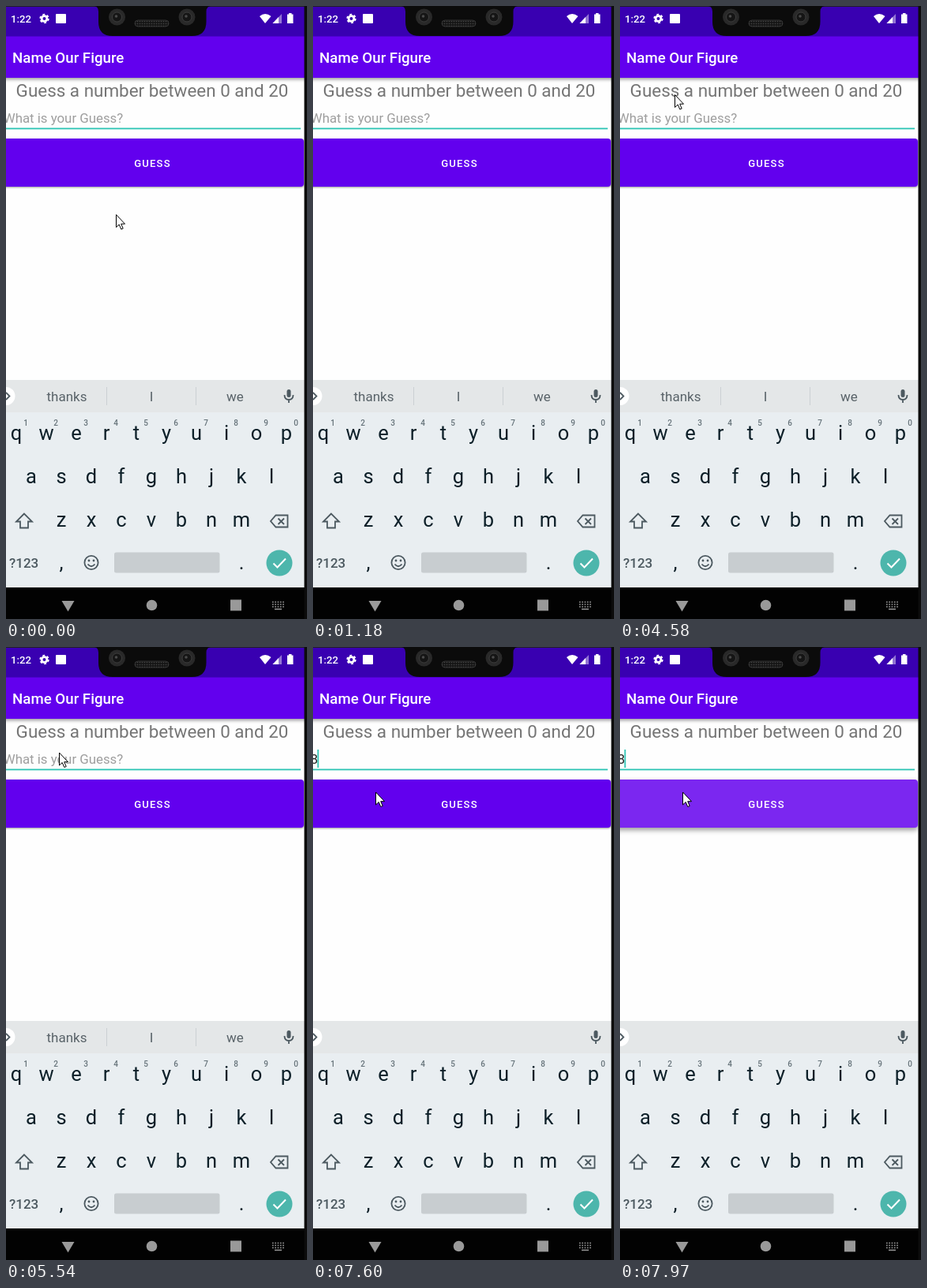
Recreate the animation shown at these times as an HTML page. Size 381 by 777 pixels, loop 8 s.

```html
<!DOCTYPE html>
<html lang="en">
<head>
<meta charset="utf-8">
<title>Number game</title>
<style>
  html, body { margin: 0; width: 100%; height: 100%; overflow: hidden; background: #fff; }
  svg { display: block; width: 381px; height: 777px; font-family: Roboto, sans-serif; }
  .mid { text-anchor: middle; }
  .key { font-size: 25.5px; fill: #0c1f28; }
  .digit { font-size: 10px; font-weight: 500; fill: #66737a; }
  .word { font-size: 17px; fill: #586268; }
  .line { fill: none; stroke: #4c5960; stroke-width: 1.8; }
  .medium { font-weight: 500; }
</style>
</head>
<body>
<svg viewBox="0 0 381 777">
  <defs>
    <clipPath id="buttonShape"><rect x="-7" y="168" width="384" height="61" rx="4"/></clipPath>
    <pattern id="mesh" width="3" height="3" patternUnits="userSpaceOnUse">
      <rect width="3" height="3" fill="#161616"/><circle cx="1.5" cy="1.5" r=".8" fill="#444"/>
    </pattern>
  </defs>
  <rect width="381" height="777" fill="#fefefe"/>

  <!-- app bar and status bar -->
  <rect x="-7" y="38" width="390" height="53" fill="#6200ee" style="filter:drop-shadow(0 2px 2px #0006)"/>
  <rect width="381" height="38.500" fill="#3900b1"/>
  <rect width="381" height="1" fill="#222"/>
  <text x="8" y="72" font-size="18.7" class="medium" fill="#fff">Name Our Figure</text>
  <text x="6" y="21" font-size="13.2" class="medium" fill="#fff">1:22</text>
  <g fill="#fff">
    <circle cx="48.500" cy="16" r="3.400" fill="none" stroke="#fff" stroke-width="2.800"/>
    <circle cx="48.500" cy="16" r="5.300" fill="none" stroke="#fff" stroke-width="1.800" stroke-dasharray="2.800 2.750"/>
    <rect x="63" y="10" width="13" height="12" rx="1"/>
    <path d="M328 22 321 13Q328 7 335.500 13Z"/>
    <path d="M337.500 22 349 10V22Z" opacity=".45"/>
    <path d="M337.500 22 345 14V22Z"/>
    <path d="M356 10.500H358V9H361.500V10.500H363.500V22H356Z"/>
  </g>
  <path d="M112 0Q117 1 117 7V20Q117 38 135 38H235Q253.500 38 253.500 20V7Q253.500 1 259 0Z" fill="#0b0b0b"/>
  <g id="cameras"></g>
  <rect x="163" y="18" width="43" height="8" rx="4" fill="url(#mesh)" stroke="#3a3a3a" stroke-width=".8"/>

  <!-- form -->
  <text x="185" y="115" font-size="22.45" fill="#757575" class="mid">Guess a number between 0 and 20</text>
  <text id="hint" x="-3.300" y="148" font-size="16.83">What is your Guess?</text>
  <text id="entry" x="-3.300" y="148" font-size="16.83" fill="#222">8</text>
  <rect y="154.500" width="373" height="1.800" fill="#2cc4b4"/>
  <rect id="caret" x="5.500" y="130" width="1.800" height="23" fill="#2cc4b4"/>
  <rect id="button" x="-7" y="168" width="384" height="61" rx="4" fill="#6200ee"/>
  <circle id="ripple" cx="160" cy="197" r="200" fill="#8a3df1" clip-path="url(#buttonShape)"/>
  <text x="185.500" y="204" font-size="13.1" letter-spacing="1.17" class="mid medium" fill="#fff">GUESS</text>

  <!-- keyboard -->
  <rect y="474" width="381" height="42" fill="#e4e7e8"/>
  <rect y="515" width="381" height="222" fill="#e9eef1"/>
  <circle cy="494.500" r="11.500" fill="#fff"/>
  <path d="M0 490 4.500 494.500 0 499" class="line"/>
  <g id="suggestions">
    <text x="77" y="501" class="word mid">thanks</text>
    <text x="184" y="501" class="word mid">I</text>
    <text x="290" y="501" class="word mid">we</text>
    <path d="M127.500 483V506M240.500 483V506" stroke="#cbd0d3"/>
  </g>
  <rect x="355.500" y="486" width="5" height="10" rx="2.500" fill="#4c5960"/>
  <path d="M352.500 493Q352.500 499 358 499T363.500 493M358 499V503" class="line" stroke-width="1.500"/>
  <g id="keys"></g>
  <path d="M23 643.500 13 653.500H18V661.500H28V653.500H33Z" class="line"/>
  <path d="M341.500 645.500H356.500V660.500H341.500L335 653ZM344.500 649.500 352 657M352 649.500 344.500 657" class="line"/>
  <text x="4" y="712" font-size="17" class="medium" fill="#4c5960">?123</text>
  <circle cx="108" cy="705.500" r="8.600" class="line"/>
  <circle cx="105" cy="703" r="1.400" fill="#4c5960"/>
  <circle cx="111" cy="703" r="1.400" fill="#4c5960"/>
  <path d="M103.500 707.500Q108 713 112.500 707.500" class="line"/>
  <rect x="137" y="692.500" width="133.500" height="26" rx="2.500" fill="#c8cdd0"/>
  <circle cx="346" cy="706" r="16.500" fill="#4db6ac"/>
  <path d="M338.500 706.500 343.500 711.500 354 700.500" fill="none" stroke="#fff" stroke-width="2"/>

  <!-- navigation bar and bezel -->
  <rect y="737" width="381" height="40" fill="#020202"/>
  <g fill="#999">
    <path d="M70.500 754H86.500L78.500 767.500Z"/>
    <circle cx="184.500" cy="759.500" r="6.800"/>
    <rect x="284" y="752.500" width="14" height="14"/>
    <path d="M337 755.500H352M337 758.500H352M337 761.500H352" stroke="#999" stroke-width="1.700" stroke-dasharray="1.700 1.600"/>
    <path d="M340 764.500H349" stroke="#999" stroke-width="1.500"/>
  </g>
  <rect x="377.500" width="3.500" height="777" fill="#0c0c0c"/>

  <path id="pointer" d="M.5.5V16.500L4.200 13 6.800 19 9.200 18 6.700 12.200H11.500Z" fill="#fff" stroke="#000"/>
</svg>
<script>
  const $ = id => document.getElementById(id);
  const LOOP = 8000;

  const label = (char, x, y, style) => `<text x="${x}" y="${y}" class="${style} mid">${char}</text>`;
  const row = (chars, x, y, style) =>
    [...chars].map((char, i) => label(char, x + 38 * i, y, style)).join('');

  $('keys').innerHTML =
    row('qwertyuiop', 13, 550, 'key') + row('1234567890', 25, 531.5, 'digit') +
    row('asdfghjkl', 32, 605, 'key') + row('zxcvbnm', 70, 660, 'key') +
    label(',', 70, 714, 'key') + label('.', 298, 714, 'key');

  $('cameras').innerHTML = [140.5, 229].map(x =>
    `<circle cx="${x}" cy="14" r="10.5" fill="#292929"/>
     <circle cx="${x}" cy="14" r="6" fill="#151515" stroke="#3d3d3d"/>
     <circle cx="${x - 1}" cy="13" r="1.8" fill="#4a4a4a"/>`).join('');

  // time, x, y; no position means the pointer is hidden
  const pointerStops = [
    [0, 139, 264], [120, 139, 261], [260, 150, 340], [385, 165, 470], [510, 174, 560],
    [660, 160, 529], [785, 95, 620], [910, 27, 695], [1050, 176, 343], [1180],
    [3170, 147, -4], [3320, 94, 38], [4430, 72, 95], [4580, 69, 112], [4705, 65, 127],
    [4830, 67, 133.5], [5820, 55, 147], [5970, 54, 148],
    [7360, 62, 160], [7480, 73, 176], [7600, 79, 183.5]
  ];

  const show = (id, visible) => $(id).setAttribute('visibility', visible ? 'visible' : 'hidden');
  const between = (t, from, to) => t >= from && t < to;

  function draw(t) {
    const [, x, y] = pointerStops.findLast(stop => stop[0] <= t);
    show('pointer', x !== undefined);
    if (x !== undefined) $('pointer').setAttribute('transform', `translate(${x} ${y})`);

    const typed = t >= 6640;
    show('hint', !typed);
    show('suggestions', !typed);
    show('entry', typed);
    show('caret', typed && !between(t, 7070, 7600));
    $('hint').setAttribute('fill', between(t, 5260, 5540) ? '#757575' : '#9e9e9e');

    const pressed = t >= 7850;
    show('ripple', between(t, 7850, 7970));
    $('button').setAttribute('fill', t >= 7970 ? '#7b27f0' : '#6200ee');
    $('button').style.filter = `drop-shadow(0 ${pressed ? '3px 3px' : '1px 1px'} #0006)`;
  }

  function tick() {
    draw(performance.now() % LOOP);
    requestAnimationFrame(tick);
  }
  tick();
</script>
</body>
</html>
```
